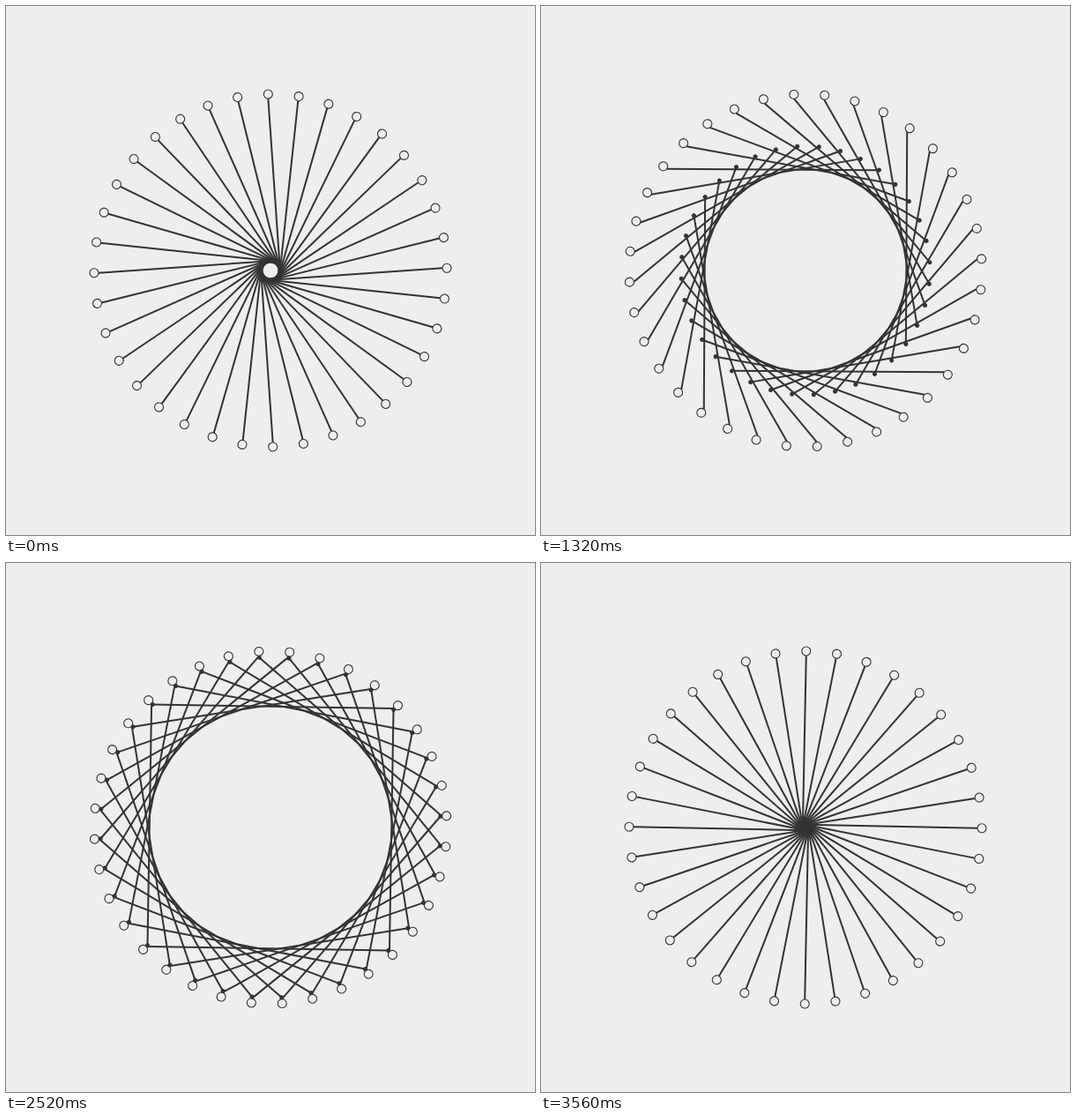
Write an HTML page without scripts that moves like this. It is 600 by 600 pixels and loops after 3600 ms.

```html
<!DOCTYPE html>
<html lang="en">
<head>
<meta charset="utf-8">
<title>Spoke ring</title>
<style>
  html, body { margin: 0; width: 100%; height: 100%; overflow: hidden; background: #eee; }
  svg { display: block; width: 100vw; height: 100vh; }
  .rod { stroke: #333; stroke-width: 2; }
  .tip { fill: #333; }
  .ring { fill: none; stroke: #333; stroke-width: 1.1; }
</style>
</head>
<body>
<svg viewBox="-300 -300 600 600">
  <defs>
    <!-- The tip swings sinusoidally along the diameter square to its ring. -->
    <g id="spoke">
      <line class="rod" y1="-195" x2="10.5">
        <animate attributeName="x2" values="-200;200;-200" keyTimes="0;.5;1"
          calcMode="spline" keySplines=".3642 0 .6358 1;.3642 0 .6358 1"
          begin="-930ms" dur="3600ms" repeatCount="indefinite"/>
      </line>
      <circle class="tip" cx="10.5" r="2.5">
        <animate attributeName="cx" values="-200;200;-200" keyTimes="0;.5;1"
          calcMode="spline" keySplines=".3642 0 .6358 1;.3642 0 .6358 1"
          begin="-930ms" dur="3600ms" repeatCount="indefinite"/>
      </circle>
      <circle class="ring" cy="-200" r="5"/>
    </g>
    <g id="sector">
      <use href="#spoke"/>
      <use href="#spoke" transform="rotate(10)"/>
      <use href="#spoke" transform="rotate(20)"/>
      <use href="#spoke" transform="rotate(30)"/>
      <use href="#spoke" transform="rotate(40)"/>
      <use href="#spoke" transform="rotate(50)"/>
    </g>
  </defs>
  <g>
    <!-- A quarter turn loops seamlessly: the wheel repeats every 10 degrees. -->
    <animateTransform attributeName="transform" type="rotate" from="0" to="-90"
      begin="-30ms" dur="3600ms" repeatCount="indefinite"/>
    <use href="#sector"/>
    <use href="#sector" transform="rotate(60)"/>
    <use href="#sector" transform="rotate(120)"/>
    <use href="#sector" transform="rotate(180)"/>
    <use href="#sector" transform="rotate(240)"/>
    <use href="#sector" transform="rotate(300)"/>
  </g>
</svg>
</body>
</html>
```
